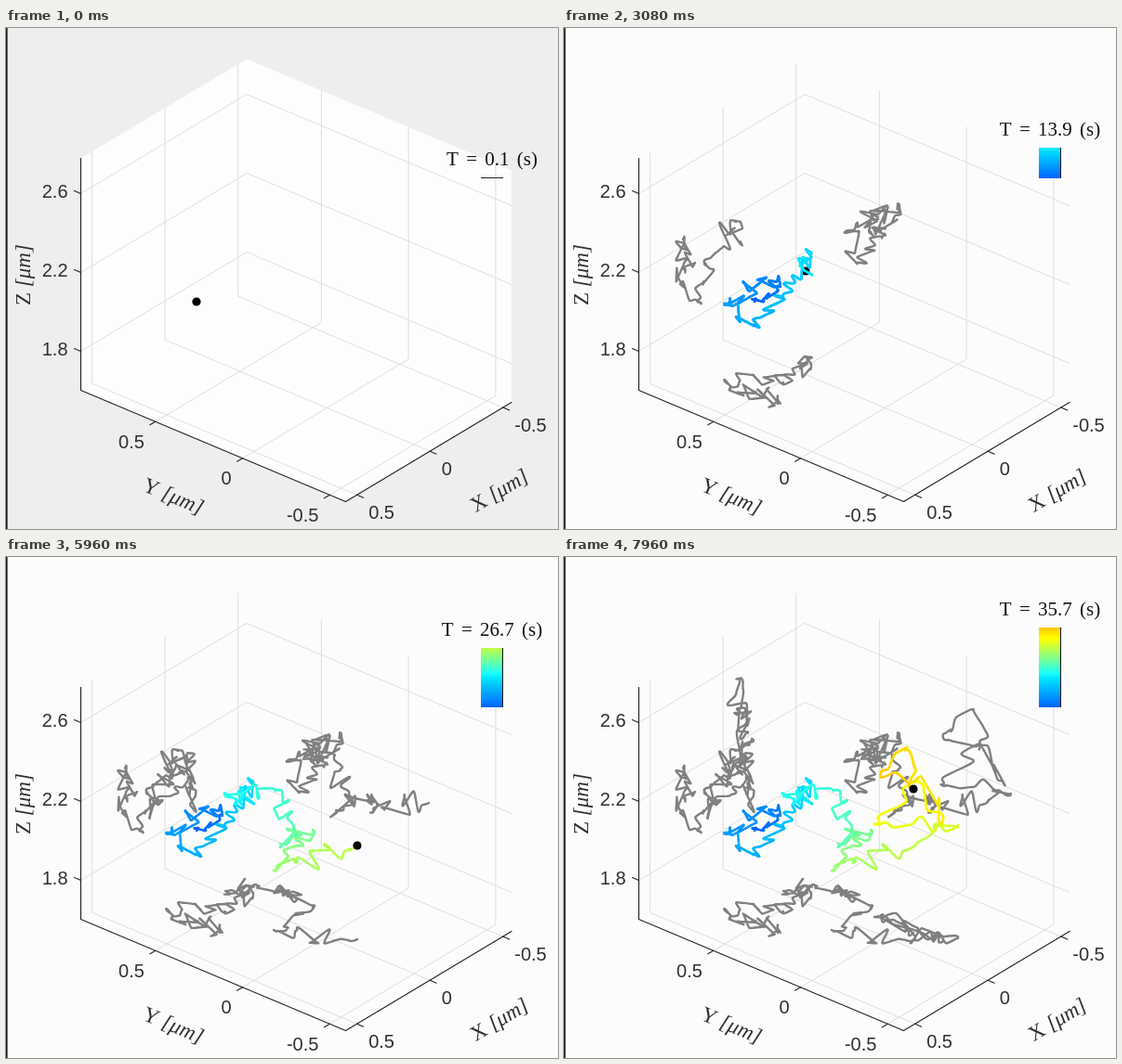
An HTML page with a canvas that plays this animation: 594 px wide and 540 px high, repeating every 8 s.

```html
<!DOCTYPE html>
<html lang="en">
<head>
<meta charset="utf-8">
<title>3D trajectory</title>
<style>
  html, body { margin: 0; width: 100%; height: 100%; overflow: hidden; background: #fcfcfc; }
  canvas { display: block; }
</style>
</head>
<body>
<canvas id="stage" width="594" height="540"></canvas>
<script>
const ctx = document.getElementById('stage').getContext('2d');
const FRAMES = 200, FRAME_MS = 40, SUB = 4;

// Box geometry: back floor corner plus the screen vectors of the two floor axes.
const BACK = [259, 283.5], ALONG_X = [-178.5, 107], ALONG_Y = [285, 120], HEIGHT = 250;
const project = (a, b, h) => [
  BACK[0] + a * ALONG_X[0] + b * ALONG_Y[0],
  BACK[1] + a * ALONG_X[1] + b * ALONG_Y[1] - h
];

// Main turns of the walk: frame, screen x, screen y, y of the floor shadow.
const TURNS = [
  [0, 205, 295, 392], [15, 230, 270, 405], [33, 173, 297, 381], [42, 204, 321, 374],
  [53, 236, 290, 382], [65, 266, 243, 362], [77, 260, 262, 354], [89, 236, 258, 360],
  [97, 290, 252, 362], [108, 309, 294, 364], [113, 295, 309, 360], [122, 330, 294, 378],
  [133, 288, 338, 402], [149, 378, 311, 412], [158, 424, 289, 411], [168, 334, 288, 388],
  [173, 381, 242, 400], [180, 407, 287, 415], [189, 367, 208, 404], [194, 343, 230, 385],
  [199, 376, 250, 405]
];
const WOBBLE = 11;

const lerp = (a, b, u) => a + (b - a) * u;
const seconds = frame => 0.1 + frame * 0.17875;

// Blue through cyan and lime to amber.
function colorAt(s) {
  const green = Math.min(98 + 10 * s, 255 - 12 * (s - 31));
  const rgb = [14.6 * (s - 13.5), green, 16 * (31 - s)];
  return `rgb(${rgb.map(v => Math.round(Math.max(0, Math.min(255, v))))})`;
}

function random(i, axis) {
  const v = Math.sin(i * 127.1 + axis * 311.7) * 43758.5453;
  return (v - Math.floor(v)) * 2 - 1;
}

function noise(x, axis) {
  const i = Math.floor(x), u = x - i;
  return lerp(random(i, axis), random(i + 1, axis), u * u * (3 - 2 * u));
}

function sampleAt(frame) {
  const next = Math.max(1, TURNS.findIndex(turn => turn[0] >= frame));
  const from = TURNS[next - 1], to = TURNS[next];
  const u = (frame - from[0]) / (to[0] - from[0]);
  const wobble = WOBBLE * Math.sqrt(Math.max(0, Math.sin(Math.PI * u)));
  const [x, y, g] = [1, 2, 3].map(k => lerp(from[k], to[k], u) + wobble * noise(frame / 1.4, k));

  const h = g - y, dx = x - BACK[0], dy = g - BACK[1];
  const det = ALONG_X[0] * ALONG_Y[1] - ALONG_Y[0] * ALONG_X[1];
  const a = (dx * ALONG_Y[1] - ALONG_Y[0] * dy) / det;
  const b = (ALONG_X[0] * dy - ALONG_X[1] * dx) / det;
  return {
    path: [x, y], floor: [x, g], left: project(a, 0, h), right: project(0, b, h),
    near: g * 1.6 + h * 0.63, color: colorAt(seconds(frame))
  };
}

const SAMPLES = Array.from({ length: (FRAMES - 1) * SUB + 1 }, (_, i) => sampleAt(i / SUB));

function line(points, color, width) {
  ctx.beginPath();
  points.forEach(p => ctx.lineTo(p[0], p[1]));
  ctx.strokeStyle = color;
  ctx.lineWidth = width;
  ctx.stroke();
}

function text(str, x, y, align) {
  ctx.textAlign = align;
  ctx.fillText(str, x, y);
}

function axisName(letter, x, y, angle) {
  const upright = '23px "Liberation Serif", serif', italic = 'italic ' + upright;
  ctx.save();
  ctx.translate(x, y);
  ctx.rotate(angle);
  ctx.font = upright;
  const head = ctx.measureText(letter + ' ').width;
  ctx.font = italic;
  const start = -(head + ctx.measureText('[μm]').width) / 2;
  text('[μm]', start + head, 7, 'left');
  ctx.font = upright;
  text(letter, start, 7, 'left');
  ctx.restore();
}

function drawBackground(frame) {
  ctx.fillStyle = frame ? '#fcfcfc' : '#eeeeee';
  ctx.fillRect(0, 0, 594, 540);
  if (!frame) {
    ctx.fillStyle = '#fdfdfd';
    ctx.beginPath();
    [[1, 0, HEIGHT], [0, 0, HEIGHT], [0, 1, HEIGHT], [0, 1, 0], [1, 1, 0], [1, 0, 0]]
      .forEach(p => ctx.lineTo(...project(...p)));
    ctx.fill();
  }
  ctx.fillStyle = '#1c1a1c';
  ctx.fillRect(0, 0, 1.6, 540);
}

function drawAxes() {
  const grid = '#dedede', ink = '#262626', labels = ['-0.5', '0', '0.5'];
  const marks = [0, 1, 2].map(i => ({
    a: 0.052 + 0.44 * i, b: 0.94 - 0.329 * i, h: 42 + 85 * i,
    label: labels[i], level: (1.8 + 0.4 * i).toFixed(1)
  }));
  for (const { a, b, h } of marks) {
    line([project(a, 0, HEIGHT), project(a, 0, 0), project(a, 1, 0)], grid, 1);
    line([project(0, b, HEIGHT), project(0, b, 0), project(1, b, 0)], grid, 1);
    line([project(1, 0, h), project(0, 0, h), project(0, 1, h)], grid, 1);
  }
  line([project(1, 0, HEIGHT), project(1, 0, 0), project(1, 1, 0), project(0, 1, 0)], ink, 1.2);

  ctx.fillStyle = '#303030';
  ctx.font = '20px "Liberation Sans", Arial, sans-serif';
  const tick = ([x, y], dx, dy, str, gapX, gapY, align) => {
    line([[x, y], [x + dx, y + dy]], ink, 1.1);
    text(str, x + gapX, y + gapY, align);
  };
  for (const { a, b, h, label, level } of marks) {
    tick(project(a, 1, 0), 7, 3, label, 12.5, 26, 'left');
    tick(project(1, b, 0), -6, 3.5, label, -12, 28.5, 'right');
    tick(project(1, 0, h), -7, -3, level, -14, 4, 'right');
  }
  axisName('Z', 19, 266, -Math.PI / 2);
  axisName('Y', 180, 505, Math.atan2(ALONG_Y[1], ALONG_Y[0]));
  axisName('X', 531, 499, Math.atan(ALONG_X[1] / ALONG_X[0]));
}

function drawTrail(count, minNear = -Infinity) {
  for (let i = 1; i <= count; i++) {
    const s = SAMPLES[i];
    if (s.near > minNear) line([SAMPLES[i - 1].path, s.path], s.color, 2.5);
  }
}

function drawParticle(frame) {
  const last = frame * SUB, now = SAMPLES[last];
  const visible = SAMPLES.slice(0, last + 1);
  if (last) {
    for (const wall of ['left', 'right', 'floor']) line(visible.map(s => s[wall]), '#808080', 2.4);
  }
  drawTrail(last);
  ctx.fillStyle = '#000';
  ctx.beginPath();
  ctx.arc(now.path[0], now.path[1], 4.6, 0, 2 * Math.PI);
  ctx.fill();
  drawTrail(last - SUB, now.near);
}

function drawLegend(frame) {
  const bottom = 162, scale = 2.41;
  const height = Math.max(1, Math.round(seconds(frame) * scale)), top = bottom - height;
  for (let row = 1; row <= height; row++) {
    ctx.fillStyle = frame ? colorAt(row / scale) : '#222';
    ctx.fillRect(511, bottom - row, 24, 1);
  }
  ctx.fillStyle = '#111';
  ctx.fillRect(534, top, 1, height);
  ctx.font = '21px "Liberation Serif", serif';
  ctx.wordSpacing = '3px';
  text(`T = ${seconds(frame).toFixed(1)} (s)`, 523, top - 13, 'center');
  ctx.wordSpacing = '0px';
}

function render() {
  const frame = Math.floor(performance.now() / FRAME_MS) % FRAMES;
  drawBackground(frame);
  drawAxes();
  drawParticle(frame);
  drawLegend(frame);
  requestAnimationFrame(render);
}

ctx.lineJoin = ctx.lineCap = 'round';
render();
</script>
</body>
</html>
```
